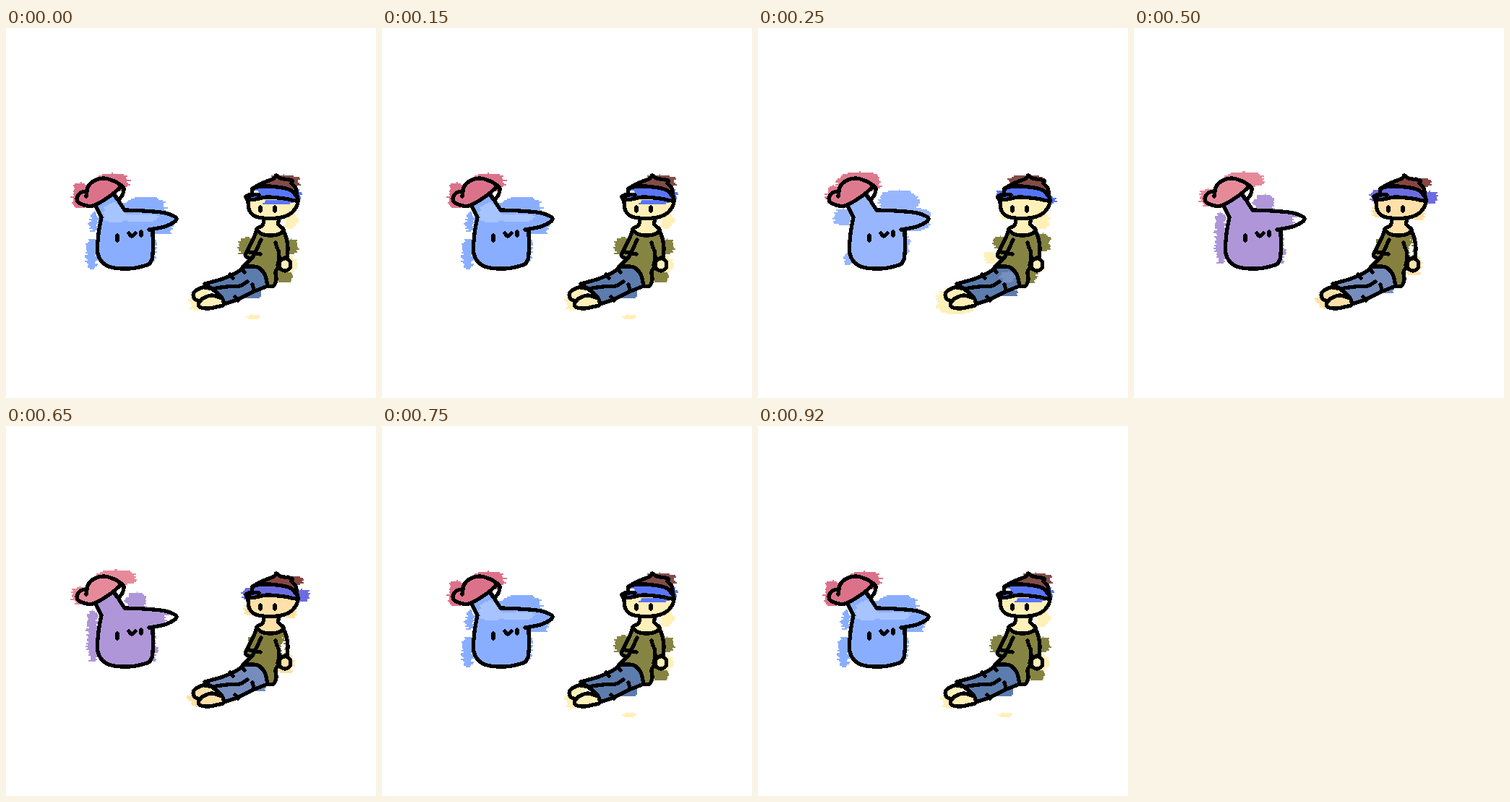
Animation, 512 px wide and 512 px high, one loop 1040 ms. Source, as an HTML page:

```html
<!DOCTYPE html>
<html>
<head>
<meta charset="utf-8">
<style>
html, body { margin: 0; width: 100%; height: 100%; overflow: hidden; background: #fff; }
svg { display: block; width: 100vw; height: 100vh; }
</style>
</head>
<body>
<svg viewBox="0 0 512 512" shape-rendering="crispEdges">
  <g id="paint"></g>
  <path id="ink" fill="none" stroke="#000" stroke-width="5.3" stroke-linecap="round" stroke-linejoin="round"/>
</svg>
<script>
// Smooth path through key points; "|" marks a sharp corner
function curve(text) {
  let d = '', last;
  for (const run of text.split('|')) {
    const p = run.trim().split(' ').map(s => s.split(',').map(Number));
    if (last) p.unshift(last);
    else d = 'M' + p[0];
    const at = i => p[Math.max(0, Math.min(p.length - 1, i))];
    const handle = (at0, from, to) => at0.map((v, k) => v + (to[k] - from[k]) / 6);
    for (let i = 0; i < p.length - 1; i++) {
      const a = p[i], b = p[i + 1];
      d += `C${handle(a, at(i - 1), b)} ${handle(b, at(i + 2), a)} ${b}`;
    }
    last = p[p.length - 1];
  }
  return d;
}

let seed = 7;
const random = () => (seed = seed * 16807 % 2147483647) / 2147483647;

// Dry-brush dab: horizontal bristles of uneven length in a rounded box
function dab(color, [x, y, rx, ry]) {
  let d = '';
  for (let v = -ry; v < ry; v += 2) {
    const reach = rx * Math.sqrt(1 - Math.abs(v / ry) ** 3);
    const left = Math.round(x - reach + (random() - .5) * 6);
    const right = Math.round(x + reach + (random() - .5) * 6);
    d += `M${left},${y + v}H${right}v2H${left}z`;
  }
  return `<path d="${d}" fill="${color}"/>`;
}

// Outlines serve both as ink and as colour areas
const outlines = {
  shirt: ['347,279 343,290 332,312 333,317 340,319 | 328,330 | 348,331 358,341 362,357 | 370,357 374,348 373,338 377,331 | 379,322 389,318 | 390,304 388,291 384,280'],
  jeans: ['275,354 300,347 320,338 330,330 | 348,331 358,341 362,357 | 340,366 322,375 302,382 | 298,372 285,361 275,354'],
  skin: [
    '335,236 336,250 342,259 355,263 375,263 392,258 402,247 404,237 400,226',
    '357,264 355,273 347,278 354,285 366,287 378,285 384,279 377,272 378,264',
    '386,318 379,323 379,332 386,336 393,332 393,323 386,318',
    '285,361 272,359 260,366 261,375 269,378',
    '299,374 284,370 270,376 267,385 280,388 300,384'
  ],
  hair: ['341,222 354,215 371,208 374,204 380,208 396,211 395,215 401,222 403,234 | 393,224 375,220 354,219 341,222'],
  band: ['341,222 354,219 375,220 393,224 403,234 | 402,239 385,236 362,234 345,237 334,238 | 332,233 340,229 341,222'],
  body: ['124,246 132,262 | 128,285 127,312 138,328 160,333 188,330 202,320 203,280 | 198,279 | 222,274 236,264 220,256 190,253 164,252 | 150,230'],
  cap: ['111,233 113,221 121,212 136,208 152,213 160,219 | 142,234 120,246 103,243 98,236 103,228 112,226']
};
const details = [
  '160,218 163,222 161,231 155,237 150,231',
  '170,284 174,288 179,284',
  '332,234 342,231 350,231',
  '353,293 347,306 341,318', '337,310 352,313', '373,297 375,304', '377,308 378,318 376,328',
  '285,361 305,358 323,357 334,351',
  '310,341 314,346', '326,333 330,338', '341,355 343,362', '317,372 321,377'
];
const eye = (x, y, h) => `M${x},${y}v${h}`;
const eyes = eye(154, 287, 7) + eye(187, 282, 5) + eye(352, 248, 5) + eye(372, 248, 5);

// Each part: its colour, then the dabs straying past its outline
const looks = [
  {
    shirt: ['#868442', [334, 302, 13, 13], [394, 302, 10, 11], [384, 342, 13, 10]],
    jeans: ['#5c7cae', [338, 368, 16, 6]],
    skin: ['#fff0b8', [394, 264, 9, 14], [394, 326, 7, 12], [264, 380, 10, 11], [342, 399, 9, 4]],
    hair: ['#824c48', [384, 213, 22, 11]],
    band: ['#5a76f8', [398, 229, 11, 8]],
    body: ['#8aaeff', [192, 249, 29, 17], [216, 274, 16, 11], [118, 312, 8, 22], [122, 268, 6, 14], [203, 305, 5, 18]],
    cap: ['#dc728a', [146, 213, 24, 13], [105, 231, 13, 18]],
    over: [['#a8c4ff', [150, 255, 16, 14]], ['#a8c4ff', [186, 262, 24, 6]], ['#5a76f8', [376, 240, 20, 4]], ['#fff', [341, 228, 7, 5]]]
  },
  {
    shirt: ['#868442', [336, 296, 11, 9], [394, 296, 11, 13], [379, 342, 7, 11]],
    jeans: ['#5c7cae', [346, 366, 14, 5]],
    skin: ['#fff0b8', [346, 257, 12, 8], [392, 266, 11, 12], [321, 317, 8, 9], [390, 328, 6, 9], [274, 377, 27, 19]],
    hair: ['#824c46', [371, 209, 24, 7]],
    band: ['#5674f6', [342, 230, 14, 7], [400, 237, 13, 6]],
    body: ['#98b6fe', [194, 241, 27, 18], [218, 264, 20, 17], [118, 261, 12, 12], [204, 296, 5, 18], [127, 318, 6, 10]],
    cap: ['#de7a8e', [140, 212, 30, 14], [106, 230, 11, 13]],
    over: [['#7890c0', [346, 344, 10, 8]]]
  },
  {
    shirt: ['#86803e', [340, 304, 5, 14]],
    jeans: ['#768cbc', [350, 363, 10, 4]],
    skin: ['#ffe0a8', [344, 253, 14, 9], [392, 254, 10, 12], [386, 328, 11, 14], [272, 375, 19, 14]],
    hair: ['#884640', [390, 213, 20, 7]],
    band: ['#6c6ce2', [340, 231, 12, 9], [408, 234, 13, 9]],
    body: ['#ae96d8', [180, 242, 14, 13], [120, 290, 8, 36], [204, 304, 4, 22]],
    cap: ['#e68a9a', [152, 209, 27, 11], [104, 234, 12, 13]],
    over: [['#fff', [229, 265, 8, 7]], ['#fff', [384, 304, 3, 12]]]
  }
];

function draw(look) {
  const parts = Object.keys(outlines);
  const strays = parts.flatMap(part => look[part].slice(1).map(d => dab(look[part][0], d)));
  const fills = parts.flatMap(part => outlines[part].map(o => `<path d="${curve(o)}" fill="${look[part][0]}"/>`));
  const over = look.over.map(([color, d]) => dab(color, d));
  return `<g>${[...strays, ...fills, ...over].join('')}</g>`;
}

const paint = document.getElementById('paint');
paint.innerHTML = looks.map(draw).join('');
const lines = [...Object.values(outlines).flat(), ...details];
document.getElementById('ink').setAttribute('d', lines.map(curve).join('') + eyes);

const start = performance.now();
function tick() {
  const t = (performance.now() - start) % 1040;
  // The first look returns for the last, longer step
  const shown = Math.min(3, Math.floor(t / 250)) % looks.length;
  [...paint.children].forEach((g, i) => g.style.display = i === shown ? '' : 'none');
  requestAnimationFrame(tick);
}
tick();
</script>
</body>
</html>
```
